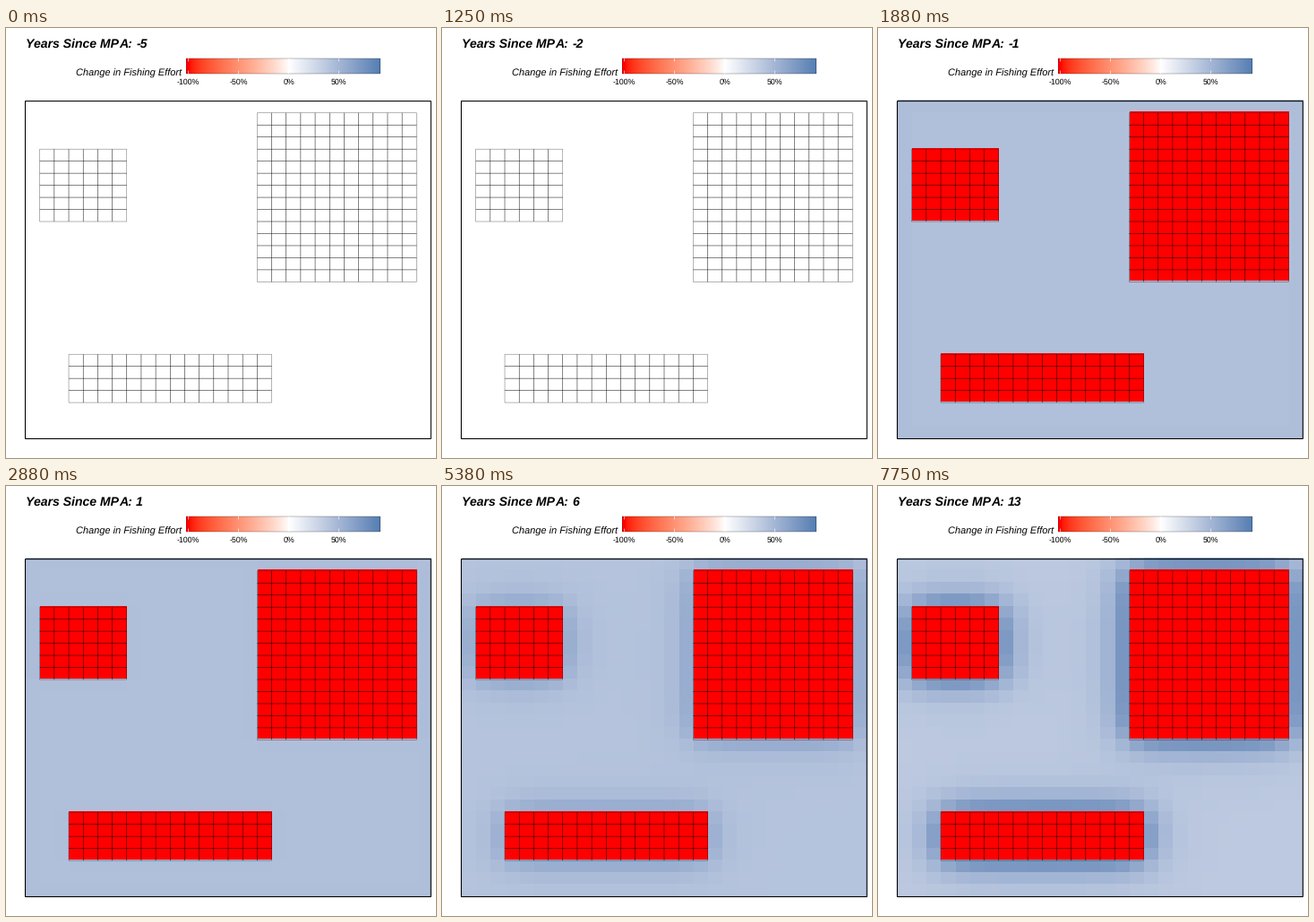
Recreate the animation shown at these times as a matplotlib script. Size 480 by 480 pixels, loop 8 s.

```python
import numpy as np
import matplotlib
import matplotlib.pyplot as plt
from matplotlib.animation import FuncAnimation
from matplotlib.patches import Rectangle

matplotlib.rcParams["text.hinting"] = "none"
matplotlib.rcParams["font.family"] = "Liberation Sans"

SIZE, DPI = 480, 72          # at 72 dpi one point is one pixel
FRAMES, STEP_MS = 64, 125
N = 28                       # cells per side
LEFT, RIGHT, TOP, BOTTOM = 21.5, 474.5, 81.3, 458.5
CELL_W, CELL_H = (RIGHT - LEFT) / N, (BOTTOM - TOP) / N

# closed areas: first column, first row, columns, rows
AREAS = [(1, 4, 6, 6), (16, 1, 11, 14), (3, 21, 14, 4)]

FIRST_YEAR = -5
# animation step at which each year's title appears
YEAR_STEPS = [0, 2, 6, 10, 15, 18, 23, 27, 31, 35, 38, 41, 44, 47, 50, 53, 56, 59, 62]

# --- colour scale: red - white - blue, blended in CIE Lab ---
TO_XYZ = np.array([[0.4124, 0.3576, 0.1805],
                   [0.2126, 0.7152, 0.0722],
                   [0.0193, 0.1192, 0.9505]])
WHITE = TO_XYZ.sum(axis=1)


def rgb_to_lab(rgb):
    c = np.asarray(rgb) / 255
    lin = np.where(c > 0.04045, ((c + 0.055) / 1.055) ** 2.4, c / 12.92)
    t = TO_XYZ @ lin / WHITE
    fx, fy, fz = np.where(t > 0.008856, np.cbrt(t), 7.787 * t + 16 / 116)
    return np.array([116 * fy - 16, 500 * (fx - fy), 200 * (fy - fz)])


def lab_to_rgb(lab):
    fy = (lab[..., 0] + 16) / 116
    f = np.stack([fy + lab[..., 1] / 500, fy, fy - lab[..., 2] / 200], axis=-1)
    xyz = np.where(f > 0.2069, f ** 3, (f - 16 / 116) / 7.787) * WHITE
    lin = np.clip(xyz @ np.linalg.inv(TO_XYZ).T, 0, 1)
    rgb = np.where(lin > 0.0031308, 1.055 * lin ** (1 / 2.4) - 0.055, 12.92 * lin)
    return np.round(rgb, 4)


LAB_RED, LAB_WHITE, LAB_BLUE = map(
    rgb_to_lab, [(255, 0, 0), (255, 255, 255), (64, 115, 171)])


def colour(values):
    v = np.clip(values, -1, 1)[..., None]
    end = np.where(v < 0, LAB_RED, LAB_BLUE)
    weight = np.abs(v) ** np.where(v < 0, 0.85, 1)
    return lab_to_rgb(LAB_WHITE + weight * (end - LAB_WHITE))


# --- fishing effort field ---
mask = np.zeros((N, N))
for col, row, cols, rows in AREAS:
    mask[row:row + rows, col:col + cols] = 1


def blur(grid, sigma):
    i = np.arange(N)
    span = np.arange(-N, N + 1)
    kernel = np.exp(-(i[:, None] - i) ** 2 / (2 * sigma ** 2))
    kernel /= np.exp(-span ** 2 / (2 * sigma ** 2)).sum()
    return kernel @ grid @ kernel.T


padded = np.pad(mask, 1)
touching = np.maximum.reduce([padded[:-2, 1:-1], padded[2:, 1:-1],
                              padded[1:-1, :-2], padded[1:-1, 2:]])
spillover = (0.82 * blur(mask, 1.25) + 0.18 * blur(mask, 3)) / 0.357
rim = np.ones((N, N))
rim[1:-1, 1:-1] = 0


def effort(year):
    if year < -1:
        return np.zeros((N, N))
    gain = np.interp(year, [0, 1, 3, 5, 10, 13], [0, 0.006, 0.04, 0.11, 0.28, 0.37])
    spread = np.clip((year - 2) / 5, 0, 1)
    halo = (1 - spread) * touching + spread * spillover
    edge = 0.012 * np.clip(1 - year / 6, 0, 1) * rim
    return np.where(mask > 0, -1, 0.43 - 0.18 * gain + gain * halo + edge)


def state(step):
    """Title year and effort field at an animation step."""
    index = np.searchsorted(YEAR_STEPS, step, side="right") - 1
    year = FIRST_YEAR + int(index)
    field = effort(year)
    # one half-way step leads into each new year
    if index + 1 < len(YEAR_STEPS) and step + 1 == YEAR_STEPS[index + 1]:
        field = (field + effort(year + 1)) / 2
    return year, field


# --- stage ---
fig = plt.figure(figsize=(SIZE / DPI, SIZE / DPI), dpi=DPI, facecolor="white")
ax = fig.add_axes([0, 0, 1, 1])
ax.axis("off")


def frame_box(x0, y0, x1, y1, **style):
    ax.add_patch(Rectangle((x0, y0), x1 - x0, y1 - y0, fill=False,
                           snap=False, **style))


def line(xs, ys, **style):
    ax.plot(xs, ys, solid_capstyle="butt", snap=False, **style)


# title, split where kerning would pull letters together
TITLE = dict(fontsize=14, weight="bold", style="italic")
for x, part in [(21.5, "Y"), (30.8, "ears Since MP"), (126.5, "A:")]:
    ax.text(x, 22, part, **TITLE)
year_text = ax.text(145.2, 22, "", **TITLE)

# legend
ZERO_X, UNIT = 315.7, 112
BAR_L, BAR_R, BAR_T, BAR_B = 201.2, 417.6, 34, 51
ramp = (np.linspace(BAR_L, BAR_R, 217) - ZERO_X) / UNIT
ax.imshow(colour(ramp[None, :]), extent=(BAR_L, BAR_R, BAR_B, BAR_T),
          interpolation="nearest", aspect="auto")
frame_box(BAR_L, BAR_T, BAR_R, BAR_B, lw=0.5, edgecolor="black", alpha=0.5)
ax.text(78.3, 54, "Change in Fishing Effort", fontsize=11, style="italic")
for percent in (-100, -50, 0, 50):
    x = ZERO_X + UNIT * percent / 100
    for y0, y1 in ((BAR_T, BAR_T + 3.4), (BAR_B - 3.4, BAR_B)):
        line([x, x], [y0, y1], color="white", lw=0.6)
    ax.text(x, 63, f"{percent}%", fontsize=8.8, ha="center")

# map
cells = ax.imshow(np.ones((N, N, 3)), extent=(LEFT, RIGHT, BOTTOM, TOP),
                  interpolation="nearest", aspect="auto")
for col, row, cols, rows in AREAS:
    xs = LEFT + CELL_W * (col + np.arange(cols + 1))
    ys = TOP + CELL_H * (row + np.arange(rows + 1))
    for k, x in enumerate(xs):
        line([x, x], [ys[0], ys[-1]], color="black", lw=0.53,
             alpha=0.9 if 0 < k < cols else 0.55)
    for k, y in enumerate(ys):
        line([xs[0], xs[-1]], [y, y], color="black", lw=0.53,
             alpha=0.9 if 0 < k < rows else 0.55)
frame_box(LEFT, TOP + 0.3, RIGHT - 0.2, BOTTOM, lw=1.07, edgecolor="black", zorder=5)

ax.set_xlim(0, SIZE)
ax.set_ylim(SIZE, 0)


def update(step):
    year, field = state(step)
    year_text.set_text(str(year))
    cells.set_data(colour(field))
    return cells, year_text


anim = FuncAnimation(fig, update, frames=FRAMES, interval=STEP_MS,
                     repeat=True, repeat_delay=0, blit=False)
plt.show()
```
